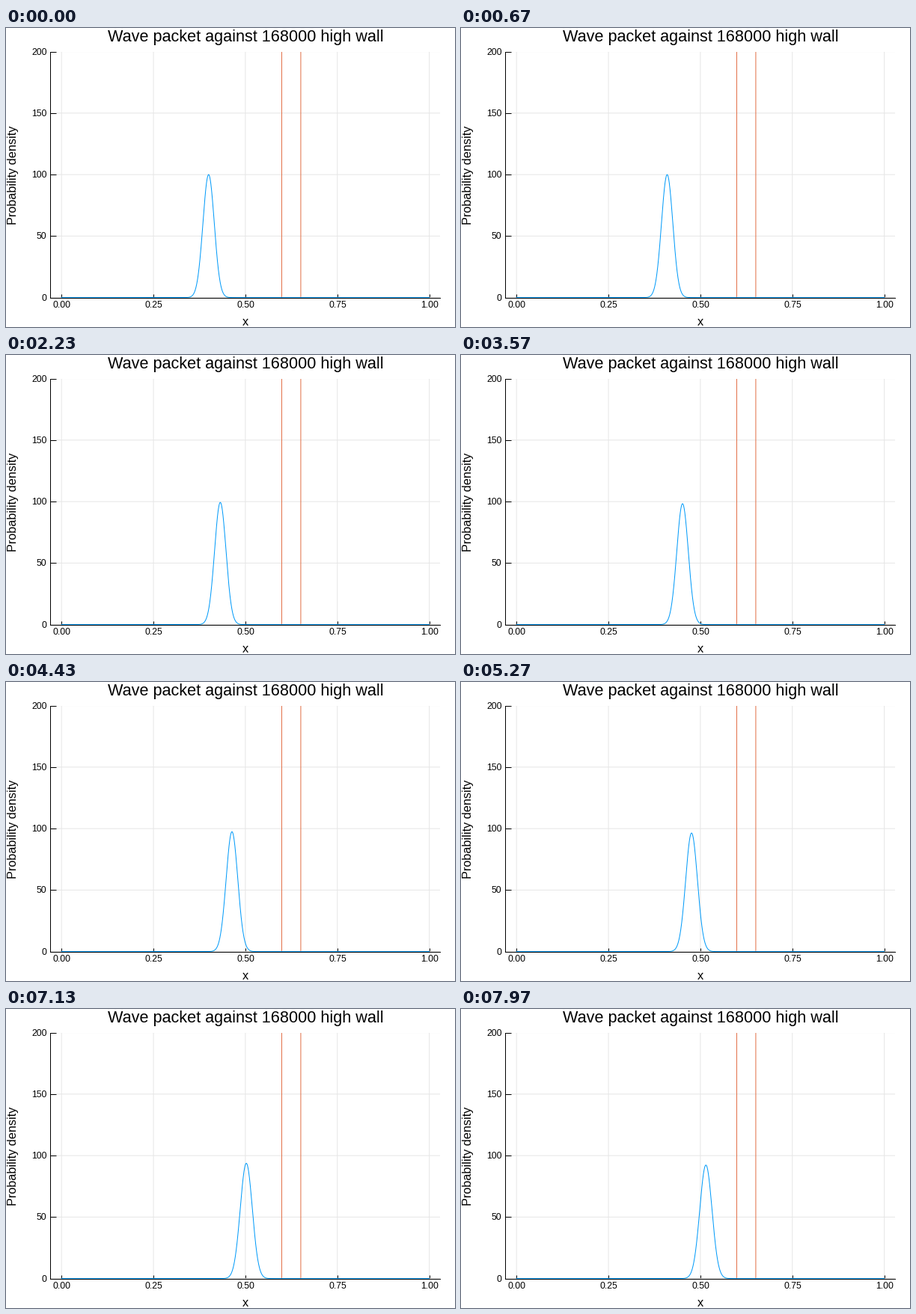
Write a matplotlib script that moves like this. It is 600 px wide and 400 px high and loops after 8000 ms.

```python
import numpy as np
import matplotlib.pyplot as plt
from matplotlib.animation import FuncAnimation

W, H, DPI = 600, 400, 100
FRAMES, LOOP_MS = 240, 8000
PX = 72 / DPI                      # points per pixel
LEFT, RIGHT, TOP, BOTTOM = 59.4, 580.4, 31.6, 360.6

START, SPEED = 0.4, 0.000481       # centre of the packet, shift per frame
SIGMA, SPREAD = 0.0154, 573        # initial width, dispersion time in frames
WALL = (0.5988, 0.6506)

plt.rcParams["font.family"] = "Liberation Sans"
fig = plt.figure(figsize=(W / DPI, H / DPI), dpi=DPI, facecolor="white")
ax = fig.add_axes([LEFT / W, 1 - BOTTOM / H,
                   (RIGHT - LEFT) / W, (BOTTOM - TOP) / H])
ax.set_xlim(-0.03, 1.03)
ax.set_ylim(0, 200)
ax.set_axisbelow(True)
ax.grid(color="#e6e6e6", lw=PX, snap=False)
ax.spines[["top", "right"]].set_visible(False)
for side in ("left", "bottom"):
    ax.spines[side].set_linewidth(PX)

xticks, yticks = np.linspace(0, 1, 5), np.arange(0, 201, 50)
ax.set_xticks(xticks, [""] * 5)
ax.set_yticks(yticks, [""] * 5)
ax.tick_params(axis="x", direction="in", length=5 * PX, width=PX)
ax.tick_params(axis="y", direction="in", length=8 * PX, width=PX)


def label(x, y, text, size, ha="center", **kw):
    """Write text with its baseline at a pixel position from the top left."""
    fig.text(x / W, 1 - y / H, text, fontsize=size * PX, color="black",
             ha=ha, va="baseline", **kw)


def to_px(x, y):
    return (LEFT + (x + 0.03) / 1.06 * (RIGHT - LEFT),
            BOTTOM - y / 200 * (BOTTOM - TOP))


for v in xticks:
    label(to_px(v, 0)[0] + 0.5, 374.5, f"{v:.2f}", 12.3)
for v in yticks:
    label(54.5, to_px(0, v)[1] + 4, f"{v}", 12.3, ha="right")
label(320, 18, "Wave packet against 168000 high wall", 21.6)
label(320, 398, "x", 16.2)
label(14, 196.5, "Probability density", 16.2,
      rotation=90, rotation_mode="anchor")

for edge in WALL:
    ax.plot([edge, edge], [0, 200], color="#e26f46", lw=PX, snap=False)

x = np.linspace(0, 1, 2001)
packet, = ax.plot([], [], color="#009af9", lw=PX, snap=False)


def draw(n):
    """Free Gaussian packet: drifts at constant speed and disperses."""
    widen = np.sqrt(1 + (n / SPREAD) ** 2)
    u = (x - START - SPEED * n) / (SIGMA * widen)
    packet.set_data(x, 100 / widen * np.exp(-u ** 2 / 2))
    return packet,


anim = FuncAnimation(fig, draw, frames=FRAMES, interval=LOOP_MS / FRAMES,
                     repeat=True, repeat_delay=0, blit=False)
plt.show()
```
